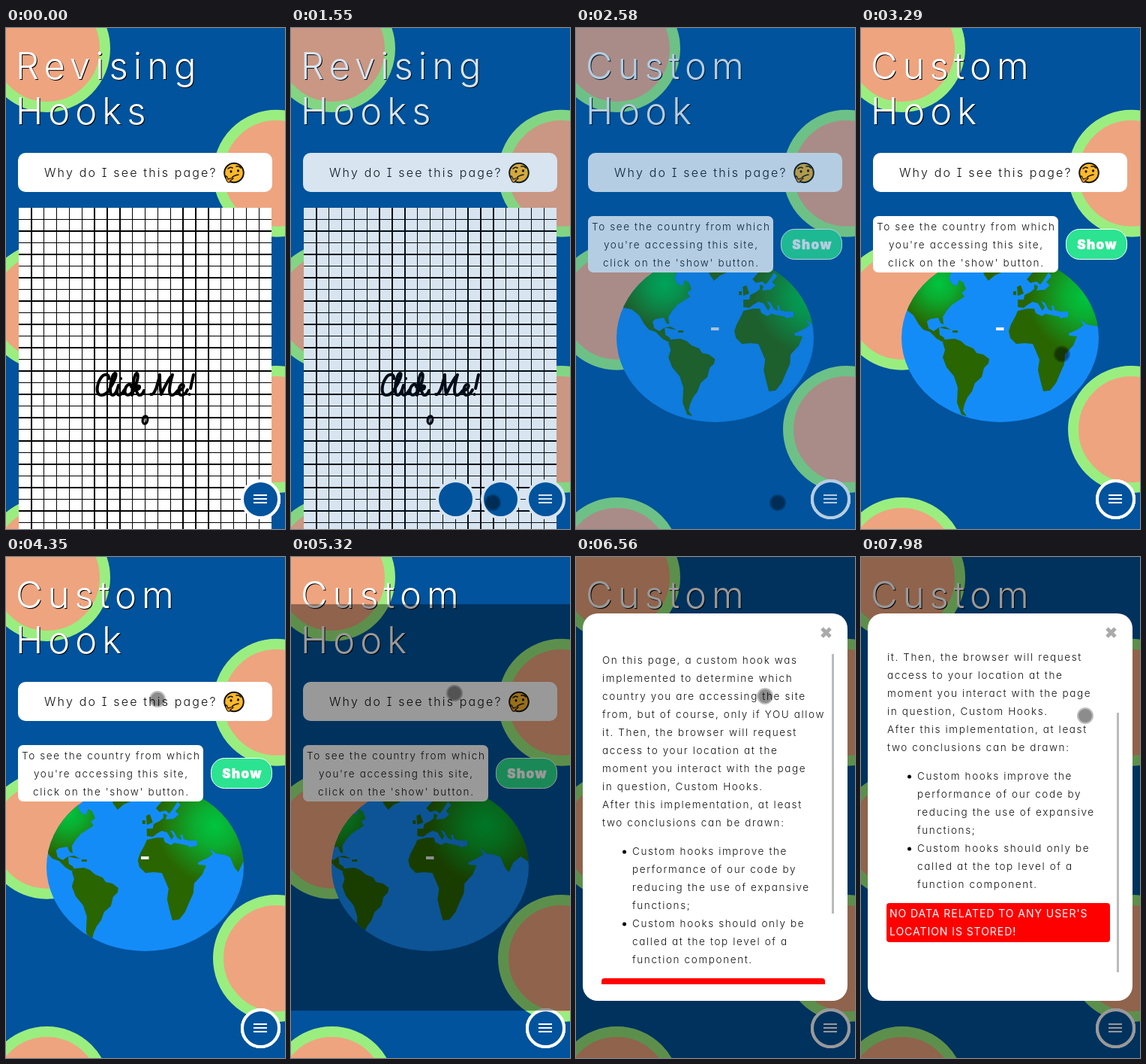
Write an HTML page that moves like this. It is 372 px wide and 666 px high and loops after 8000 ms.

```html
<!DOCTYPE html>
<html lang="en">
<head>
<meta charset="utf-8">
<title>Hooks</title>
<style>
html, body { margin: 0; width: 372px; height: 666px; overflow: hidden; background: #00539c; }
svg { display: block; }
text {
  font: 300 13.5px Inter, Lato, sans-serif; letter-spacing: .12em; fill: #111;
  font-feature-settings: "cv11"; white-space: pre;
}
.title { font-size: 49px; letter-spacing: 7px; fill: #fff; }
.shade { fill: #000; }
.ask { font-size: 16px; letter-spacing: .135em; font-feature-settings: "cv11", "cv08"; }
.mid { text-anchor: middle; }
.show { font-size: 17px; font-weight: 900; letter-spacing: 1.5px; fill: #fff; stroke: #fff; stroke-width: .5; }
.note { font-size: 14px; font-weight: 400; letter-spacing: .95px; fill: #fff; }
.script { fill: none; stroke: #000; stroke-width: 4; stroke-linecap: round; stroke-linejoin: round; }
.fab { fill: #00539c; stroke: #fff; stroke-width: 4; }
</style>
</head>
<body>
<svg width="372" height="666" viewBox="0 0 372 666">
  <defs>
    <clipPath id="disc"><ellipse cx="185.5" cy="412" rx="131.5" ry="112"/></clipPath>
    <clipPath id="view"><rect x="34" y="128" width="300" height="440"/></clipPath>
    <radialGradient id="glow">
      <stop offset="0" stop-color="#00c540"/>
      <stop offset=".35" stop-color="#00c540" stop-opacity=".75"/>
      <stop offset="1" stop-color="#00c540" stop-opacity="0"/>
    </radialGradient>
    <path id="land" d="M40 300H122L120 325L117 333L122 341L128 343L131 335L136 338L140 347L134 352L138 357L130 362L121 368L114 376L109 384L110 394L106 392L103 385L92 387L88 390L90 399L97 403L104 398L105 408L110 411L113 416L108 417L101 413L92 404L83 401L77 394L70 382L60 374L40 370Z
      M104 398L112 397L120 401L112 400Z M122 402h7v3h-7Z
      M158 300H191L187 325L178 329L170 336L164 328Z
      M109 418L113 414L125 413L133 416L140 422L150 426L154 432L163 434L171 440L170 446L164 452L161 464L152 472L148 483L142 491L138 500L136 509L141 516L134 514L128 498L129 478L124 463L114 451L109 438L112 428Z
      M199 412L197 403L200 394L206 383L209 376L222 373L231 373L233 379L241 383L246 380L265 384L271 396L278 409L288 410L283 422L272 434L271 447L266 458L260 472L252 482L243 483L239 468L236 455L238 441L233 429L229 420L218 419L207 420Z
      M208 344L213 342L217 353L209 356Z M203 350h4v5h-4Z
      M209 371L209 361L217 361L218 355L226 351L231 347L231 341L236 343L234 349L245 348L252 342L247 338L254 330L250 325L243 336L239 341L234 337L226 339L221 334L229 325L240 312L250 300H420V440L373 436L362 421L356 404L347 398L337 406L331 419L326 413L320 399L313 396L301 394L291 386L297 395L290 400L275 407L266 386L276 384L276 377L266 377L258 375L257 369L254 369L255 376L250 374L245 365L240 363L245 371L242 376L236 366L229 364L222 368L217 372Z"/>
    <clipPath id="coast"><use href="#land"/></clipPath>
  </defs>

  <rect width="372" height="666" fill="#00539c"/>
  <g id="page">
    <g id="rings" fill="#eea47f" stroke="#9aee7f" stroke-width="14"></g>
    <g id="heading"></g>
    <rect x="16" y="166" width="339" height="52" rx="10" fill="#fff"/>
    <text class="ask" x="51" y="198">Why do I see this page?</text>
    <g stroke="#15120c" stroke-linecap="round" fill="none" stroke-width="1.6">
      <circle cx="304" cy="192.5" r="12.8" fill="#fcb92c" stroke-width="2"/>
      <path d="M296 187q3-3 6-1M307 184q4-1 6 2M302 198q5-3 8-3"/>
      <path d="M300 190.5v.6M309.5 189.5v.6" stroke-width="3"/>
      <path d="M293 197q2-1 3 4l6-2q2 1 0 2l-3 2q0 3-3 2q-3-2-3-8Z" fill="#f29a1f" stroke-width="1.1"/>
    </g>

    <g id="first">
      <rect x="17" y="239" width="337" height="427" fill="#fff"/>
      <path id="grid" stroke="#000" stroke-width="1.4" shape-rendering="crispEdges"/>
      <g class="script">
        <path d="M137 466C138 459 130 459 126 466C120 476 120 488 127 488C132 488 136 484 138 480C145 470 149 458 145 459C140 461 136 488 142 488C146 488 148 482 150 475C147 484 148 488 151 488C154 488 157 482 159 480M153 466h.1M167 477C167 472 161 473 159 480C157 489 164 490 168 484C175 474 178 459 174 459C171 460 168 478 168 488C171 476 179 473 178 478C177 481 172 481 171 481C176 481 174 488 178 488C181 488 183 485 184 482"/>
        <path d="M193 487C198 489 202 475 205 461C205 470 205 478 207 487C211 478 216 467 222 461C218 474 216 488 221 488C225 488 227 484 229 482C236 482 239 474 235 474C230 474 228 488 234 488C238 488 240 485 242 481M250 461L246 479M244.5 487h.1"/>
        <ellipse cx="185.5" cy="521" rx="3.2" ry="5.2" stroke-width="3.4" transform="rotate(10 185.5 521)"/>
      </g>
    </g>

    <g id="second">
      <g clip-path="url(#disc)">
        <rect x="54" y="300" width="263" height="224" fill="#148cf8"/>
        <g id="map">
          <use href="#land" fill="#296500"/>
          <g clip-path="url(#coast)" fill="url(#glow)">
            <circle cx="104" cy="340" r="58"/>
            <circle cx="300" cy="357" r="78"/>
          </g>
        </g>
      </g>
      <rect x="180" y="398" width="10.5" height="4" fill="#eee"/>
      <rect x="16" y="250" width="247" height="75" rx="7" fill="#fff"/>
      <g class="mid">
        <text x="140.3" y="269">To see the country from which</text>
        <text x="140.3" y="293">you're accessing this site,</text>
        <text x="140.3" y="317">click on the 'show' button.</text>
      </g>
      <rect x="273.5" y="267.5" width="81" height="40" rx="18" fill="#2be390" stroke="#fff"/>
      <text class="show mid" x="315" y="294">Show</text>
    </g>

    <circle class="fab" id="far" cx="339.5" cy="626.5" r="24.5"/>
    <circle class="fab" id="near" cx="339.5" cy="626.5" r="24.5"/>
    <circle class="fab" cx="339.5" cy="626.5" r="24.5"/>
    <path d="M330 621h18M330 626h18M330 631h18" stroke="#fff" stroke-width="2"/>
  </g>

  <rect id="veil" width="372" height="666" fill-opacity=".4"/>
  <g id="modal">
    <rect x="9" y="75" width="353" height="515" rx="20" fill="#fff"/>
    <path d="M328 95l11 11M339 95l-11 11" stroke="#aaa" stroke-width="5"/>
    <rect id="bar" x="341" y="129" width="3" height="345" fill="#bbb"/>
    <g clip-path="url(#view)"><g id="copy"></g></g>
  </g>
  <g id="touch" fill-opacity=".26"><circle r="11"/><circle r="9"/></g>
</svg>

<script>
const $ = id => document.getElementById(id);
const LOOP = 8000, SWAP = 2000, OPEN = 4651, SCROLL = 7980;
const clamp = v => Math.max(0, Math.min(1, v));
const span = (t, start, length) => clamp((t - start) / length);
const easeOut = p => 1 - (1 - p) ** 4;
const show = (id, on) => $(id).style.display = on ? '' : 'none';
const line = (s, x, y, cls = '') => `<text class="${cls}" x="${x}" y="${y}">${s}</text>`;
const heading = words => words.map((w, i) =>
  line(w, 14, 69 + 60 * i, 'title shade') + line(w, 13, 68 + 60 * i, 'title')).join('');

const titles = [heading(['Revising', 'Hooks']), heading(['Custom', 'Hook'])];

const centres = [[54.5, 27.5], [54.5, 370.2], [54.5, 708.6], [360.5, 193.3], [360.5, 533.6]];
$('rings').innerHTML = centres.map(([x, y]) => `<circle cx="${x}" cy="${y}" r="77.5"/>`).join('');

let grid = '';
for (let i = 1; i < 20; i++) grid += `M${17 + 16.86 * i} 239V666`;
for (let i = 1; i < 28; i++) grid += `M17 ${239 + 15.5 * i}H354`;
$('grid').setAttribute('d', grid);

const intro = `On this page, a custom hook was
implemented to determine which
country you are accessing the site
from, but of course, only if YOU allow
it. Then, the browser will request
access to your location at the
moment you interact with the page
in question, Custom Hooks.
After this implementation, at least
two conclusions can be drawn:`.split('\n');
const points = `Custom hooks improve the
performance of our code by
reducing the use of expansive
functions;
Custom hooks should only be
called at the top level of a
function component.`.split('\n');
$('copy').innerHTML =
  intro.map((s, i) => line(s, 35, 142 + 24 * i)).join('') +
  points.map((s, i) => line(s, 75, 396 + 24 * i)).join('') +
  '<circle cx="64.5" cy="392" r="2.5"/><circle cx="64.5" cy="488" r="2.5"/>' +
  '<rect x="34" y="560" width="298" height="52" rx="4" fill="#f00"/>' +
  line("NO DATA RELATED TO ANY USER'S", 38, 579, 'note') +
  line('LOCATION IS STORED!', 38, 603, 'note');

// Pointer path: time, x, y
const path = [
  [660, 357, 634], [900, 340, 629], [1300, 272, 631], [1480, 269, 631], [2750, 269, 631],
  [3100, 269, 520], [3290, 268, 434], [3900, 208, 158], [4350, 202, 189], [4700, 204, 187],
  [5320, 218, 181], [6000, 227, 168], [6420, 227, 168], [6560, 252, 185], [7180, 298, 209],
  [7380, 299, 211], [8000, 299, 211]
];
function pointer(t) {
  const i = Math.max(1, path.findIndex(p => p[0] > t));
  const [a, b] = [path[i - 1], path[i]], p = span(t, a[0], b[0] - a[0]);
  return [a[1] + (b[1] - a[1]) * p, a[2] + (b[2] - a[2]) * p];
}

const scaleAt = (id, sx, sy) =>
  $(id).setAttribute('transform', `translate(186 332.5) scale(${sx} ${sy}) translate(-186 -332.5)`);

let current = -1;
function draw(t) {
  const page = t < SWAP ? 0 : 1;
  if (page !== current) {
    $('heading').innerHTML = titles[current = page];
    show('first', !page);
    show('second', page);
  }
  $('page').setAttribute('opacity', page ? span(t, 2050, 750) : 1 - span(t, 1480, 470));

  const menu = page ? 0 : easeOut(span(t, 950, 400));
  $('near').setAttribute('cx', 339.5 - 60 * menu);
  $('far').setAttribute('cx', 339.5 - 120 * menu);
  $('map').setAttribute('transform', `translate(${(3290 - t) * .02} 0)`);

  // The veil opens as a thin line, then unfolds upwards and downwards
  show('veil', t > OPEN);
  scaleAt('veil', easeOut(span(t, OPEN, 500)), .005 + .995 * easeOut(span(t, OPEN + 500, 500)));
  const zoom = easeOut(span(t, OPEN + 800, 500));
  show('modal', zoom > 0);
  scaleAt('modal', zoom, zoom);

  const down = t >= SCROLL;
  $('copy').setAttribute('transform', `translate(0 ${down ? -100 : 0})`);
  $('bar').setAttribute('y', down ? 207 : 129);

  show('touch', t >= 660);
  const [x, y] = pointer(t);
  $('touch').setAttribute('transform', `translate(${x} ${y})`);
}

const begin = performance.now();
function tick() {
  draw((performance.now() - begin) % LOOP);
  requestAnimationFrame(tick);
}
tick();
</script>
</body>
</html>
```
